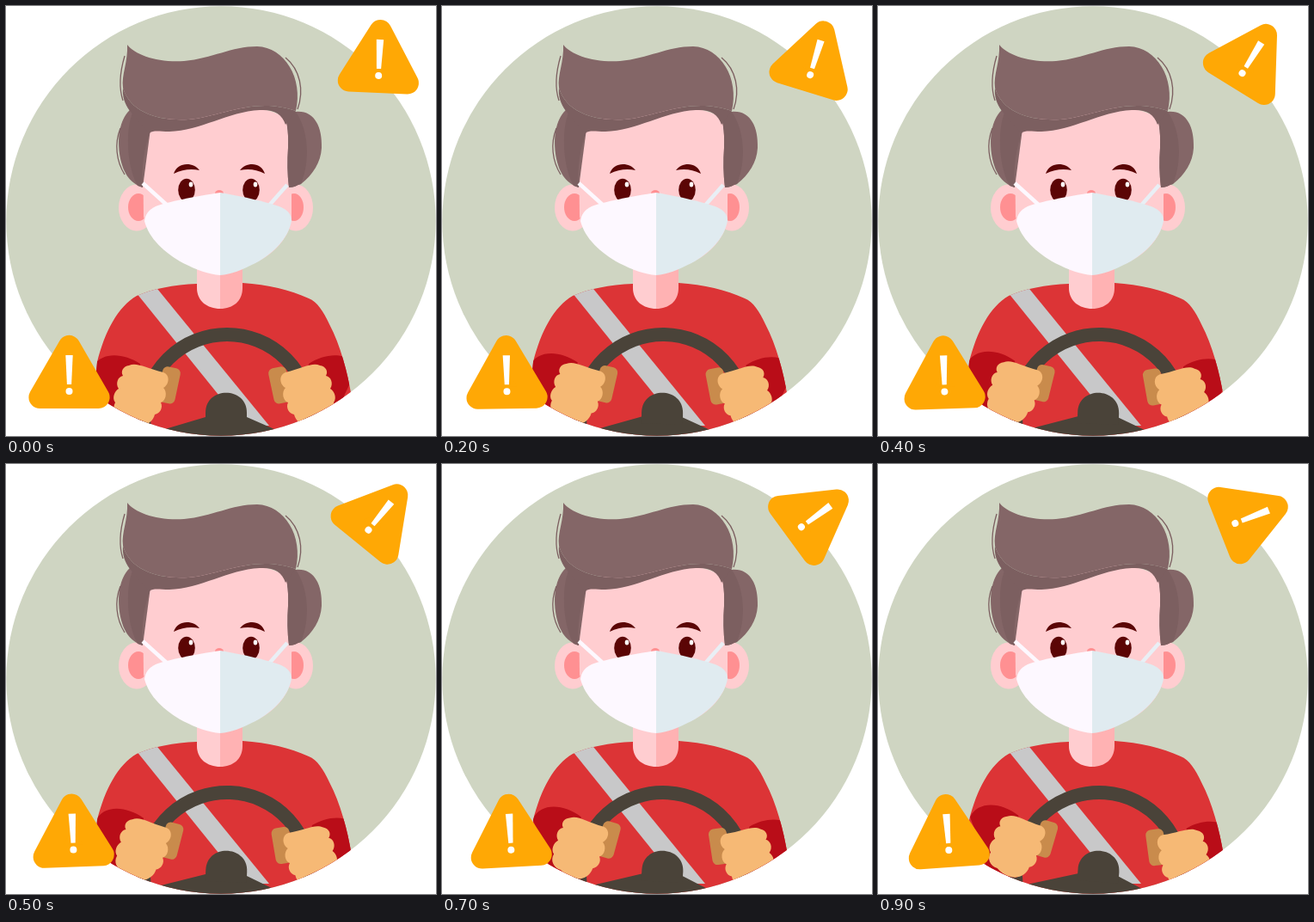
These frames come from a looping animation (500 by 500 pixels, 1000 ms). An HTML page:

```html
<!DOCTYPE html>
<html lang="en">
<head>
<meta charset="utf-8">
<title>Careful driver</title>
<style>
  html, body { margin: 0; height: 100%; overflow: hidden; background: #fff; }
  svg { display: block; width: 100%; height: 100%; }
</style>
</head>
<body>
<svg viewBox="0 0 500 500">
  <defs>
    <clipPath id="disc"><circle cx="250" cy="250" r="249.7"/></clipPath>
    <path id="shirt" d="M222 323C195 324 170 329 152 337C130 350 115 378 106 414L98 500H408L402 455C397 425 389 395 376 370C369 355 362 344 352 340C330 330 305 324 275 322Z"/>
    <clipPath id="torso"><use href="#shirt"/></clipPath>
    <g id="sign">
      <path d="M0-33.1L34.1 26H-34.1Z" fill="#ffa805" stroke="#ffa805" stroke-width="26" stroke-linejoin="round"/>
      <path d="M-4.2-23H4.2L2.6 11H-2.6Z" fill="#fff"/>
      <circle cy="19" r="4" fill="#fff"/>
    </g>
    <g id="arm">
      <path d="M100 422C108 402 135 402 156 416L160 488H140L122 476C118 456 108 440 100 422Z" fill="#b90d18"/>
      <rect x="179" y="420" width="21" height="42" rx="6" fill="#c98b4c" transform="rotate(12 190 440)"/>
      <path d="M143 418C152 414 162 421 183 426C191 429 190 440 183 444C188 449 186 459 180 461C183 467 179 474 173 475C171 483 163 489 154 488C146 487 140 483 136 479C127 477 123 468 127 461C123 456 126 448 131 445C127 439 130 431 136 430C133 425 136 419 143 418Z" fill="#f6b975"/>
    </g>
  </defs>

  <circle cx="250" cy="250" r="249.7" fill="#cfd5c2"/>

  <g clip-path="url(#disc)">
    <use href="#shirt" fill="#dc3436"/>
    <path d="M143 323L172 324L306 488H276Z" fill="#c8c8c9" clip-path="url(#torso)"/>
    <path d="M222 290H249V352C234 352 222 343 222 328Z" fill="#ffcdd0"/>
    <path d="M275 290H249V352C264 352 275 343 275 328Z" fill="#ffb2b3"/>

    <g id="wheel" fill="#4a4339">
      <circle cx="257" cy="479" r="97" fill="none" stroke="#4a4339" stroke-width="16"/>
      <path d="M232 478L168 497V530H345V520L312 492L280 478Z"/>
      <path d="M232 486V473C232 442 280 442 280 473V486Z"/>
    </g>
    <g clip-path="url(#torso)">
      <g id="arms">
        <use href="#arm"/>
        <use href="#arm" transform="translate(508) scale(-1 1)"/>
      </g>
    </g>
  </g>

  <!-- head -->
  <g fill="#ffcdd0">
    <ellipse cx="152" cy="234.5" rx="21" ry="27"/>
    <ellipse cx="337" cy="234.5" rx="20" ry="27"/>
  </g>
  <g fill="#ff9092">
    <ellipse cx="154" cy="234" rx="12" ry="16"/>
    <ellipse cx="335" cy="234" rx="11" ry="16"/>
  </g>
  <path d="M159 150C175 115 310 105 328 135L332 215V250C325 285 285 308 248 308C210 308 168 280 160 245Z" fill="#ffcdd0"/>

  <!-- hair -->
  <g fill="#846667">
    <path d="M146 119C133 130 129 150 132 172C135 192 143 206 159 211L168 143Z"/>
    <path d="M322 122C326 130 329 145 328 165C327 180 327 195 329 211C336 211 338 208 343 207C357 196 366 182 367 165C368 140 358 121 337 123Z"/>
  </g>
  <g fill="#7c5f60">
    <path d="M147 124C139 145 140 185 153 209L159 211C157 190 160 165 169 143Z"/>
    <path d="M322 122C326 130 329 145 328 165C327 180 327 195 329 211C336 211 338 208 343 207C354 180 352 145 337 123Z"/>
  </g>
  <path d="M141 45C150 57 176 66 207 64C240 61 262 47 292 47C324 48 346 84 337 122C288 105 250 129 212 132C178 134 144 124 136 95C134 80 142 65 141 45Z" fill="#846667"/>
  <path d="M136 95C144 124 178 134 212 132C250 129 288 105 337 122L325 138C321 125 311 120 295 121C258 123 226 145 190 146C178 146 172 144 166 148L144 122C138 114 135 105 136 95Z" fill="#7c5f60"/>
  <path d="M138 58C133 75 131 95 136 110M325 60C342 74 347 98 339 120M133 142C126 160 128 180 138 196" fill="none" stroke="#7c5f60" stroke-width="1.3"/>

  <!-- eyes -->
  <g fill="#5b0505">
    <path d="M195 195C199 181 218 181 225 191C215 189 205 190 195 195Z"/>
    <path d="M301 195C297 181 279 181 272 191C282 189 291 190 301 195Z"/>
    <ellipse cx="210" cy="214" rx="9.8" ry="13.3"/>
    <ellipse cx="285" cy="214" rx="9.8" ry="13.3"/>
  </g>
  <g fill="#fff">
    <ellipse cx="215" cy="207.5" rx="2.3" ry="3"/>
    <ellipse cx="290" cy="207.5" rx="2.3" ry="3"/>
  </g>
  <ellipse cx="248" cy="218" rx="5" ry="4" fill="#ff9092"/>

  <!-- mask -->
  <path d="M159 206L190 234" stroke="#fdf8ff" stroke-width="4.5"/>
  <path d="M327 208L304 234" stroke="#e9eff5" stroke-width="4.5"/>
  <path d="M249 217C222 221 186 228 174 233C166 237 162 242 161 250C166 270 184 287 206 299C222 307 236 312 249 313Z" fill="#fdf8ff"/>
  <path d="M249 217C274 221 308 229 320 234C328 238 332 242 332 250C328 270 312 287 290 299C274 307 262 312 249 313Z" fill="#e0ebf0"/>

  <use id="high" href="#sign"/>
  <use id="low" href="#sign"/>
</svg>
<script>
  const LOOP = 1000, STEP = 100;
  const place = (id, transform) =>
    document.getElementById(id).setAttribute('transform', transform);

  function draw(now) {
    // p runs from 0 to 1 in ten held poses, then snaps back
    const p = Math.floor(now % LOOP / STEP) / 9;
    place('high', `translate(${434 - p} 62) rotate(${2.5 + 66 * p})`);
    place('low', `translate(${73.5 + 7.5 * p} ${429 + p}) rotate(${-4 * p})`);
    place('wheel', `rotate(${4.3 * p} 257 479)`);
    place('arms', `rotate(${4.3 * p} 257 510)`);
  }

  const start = performance.now();
  function tick() {
    draw(performance.now() - start);
    requestAnimationFrame(tick);
  }
  tick();
</script>
</body>
</html>
```
